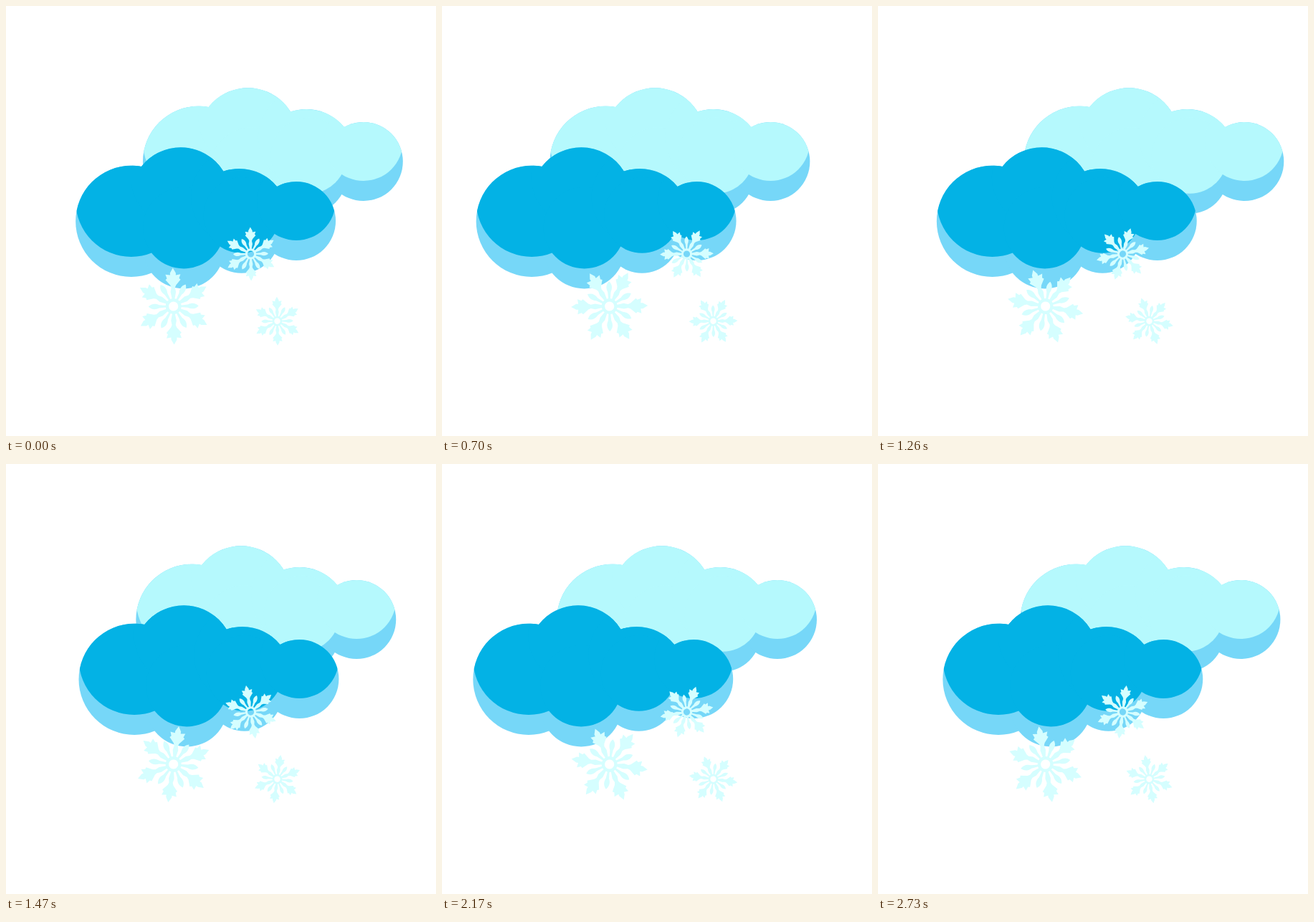
An HTML page that plays this animation: 600x600 px, repeating every 2800 ms.

```html
<!DOCTYPE html>
<html lang="en">
<head>
<meta charset="utf-8">
<title>Snow clouds</title>
<style>
  html, body { margin: 0; width: 100%; height: 100%; overflow: hidden; background: #fff; }
  svg { display: block; width: 100vw; height: 100vh; }
</style>
</head>
<body>
<svg viewBox="0 0 600 600">
  <defs>
    <g id="puffs">
      <circle cx="174.7" cy="300.4" r="77.6"/>
      <circle cx="243.8" cy="267" r="69.7"/>
      <circle cx="248" cy="337.4" r="57"/>
      <circle cx="325.5" cy="294.5" r="67.5"/>
      <circle cx="328.5" cy="319.7" r="53"/>
      <circle cx="405" cy="300" r="55"/>
    </g>
    <clipPath id="outline">
      <circle cx="174.7" cy="300.4" r="77.6"/>
      <circle cx="243.8" cy="267" r="69.7"/>
      <circle cx="248" cy="337.4" r="57"/>
      <circle cx="325.5" cy="294.5" r="67.5"/>
      <circle cx="328.5" cy="319.7" r="53"/>
      <circle cx="405" cy="300" r="55"/>
    </clipPath>
    <!-- The lit face is the cloud overlapped with itself, raised -->
    <g id="cloud">
      <use href="#puffs" fill="#76d7f8"/>
      <g clip-path="url(#outline)"><use href="#puffs" y="-28"/></g>
    </g>
    <g id="arm">
      <path d="M0-53.5L4-46.5L4-43.5L10.5-44.5L8.5-39L10.5-37L4-29.5L2.6-26L3.8-20L1.6-9H-1.6L-3.8-20L-2.6-26L-4-29.5L-10.5-37L-8.5-39L-10.5-44.5L-4-43.5L-4-46.5Z"/>
      <path transform="rotate(30)" d="M-1.2-9L-2.2-20C-5-26-4-31 0-35C4-31 5-26 2.2-20L1.2-9Z"/>
    </g>
    <g id="flake" fill="#d5feff">
      <circle r="8.8" fill="none" stroke="#d5feff" stroke-width="4.4"/>
    </g>
  </defs>
  <use id="back" href="#cloud" fill="#b5f9fd"/>
  <use id="front" href="#cloud" fill="#03b2e5"/>
  <use class="flake" href="#flake"/>
  <use class="flake" href="#flake"/>
  <use class="flake" href="#flake"/>
</svg>
<script>
const LOOP = 2800, STEP = 70, TILT = -1;
const $ = id => document.getElementById(id);
const flakes = [
  { x: 233.7, y: 419, scale: 1, spin: 1 },
  { x: 341.5, y: 346, scale: 0.7, spin: -1 },
  { x: 378.5, y: 439.7, scale: 0.635, spin: 1 }
];
const flakeNodes = document.querySelectorAll('.flake');

for (let i = 0; i < 6; i++) {
  const arm = document.createElementNS('http://www.w3.org/2000/svg', 'use');
  arm.setAttribute('href', '#arm');
  arm.setAttribute('transform', `rotate(${i * 60})`);
  $('flake').append(arm);
}

// Two sways per loop, furthest right at the given time
const sway = (t, middle, reach, peak) =>
  middle + reach * Math.cos(4 * Math.PI * (t - peak) / LOOP);

function draw(now) {
  const t = Math.floor(now % LOOP / STEP) * STEP;
  $('back').setAttribute('transform', `translate(${sway(t, 73.6, 34.4, 1190)} -83)`);
  $('front').setAttribute('transform', `translate(${sway(t, -24.7, 30.6, 140)} 0)`);
  flakes.forEach(({ x, y, scale, spin }, i) => {
    const angle = TILT + spin * 360 * t / LOOP;
    flakeNodes[i].setAttribute('transform',
      `translate(${x} ${y}) rotate(${angle}) scale(${scale})`);
  });
}

const start = performance.now();
function tick() {
  draw(performance.now() - start);
  requestAnimationFrame(tick);
}
tick();
</script>
</body>
</html>
```
